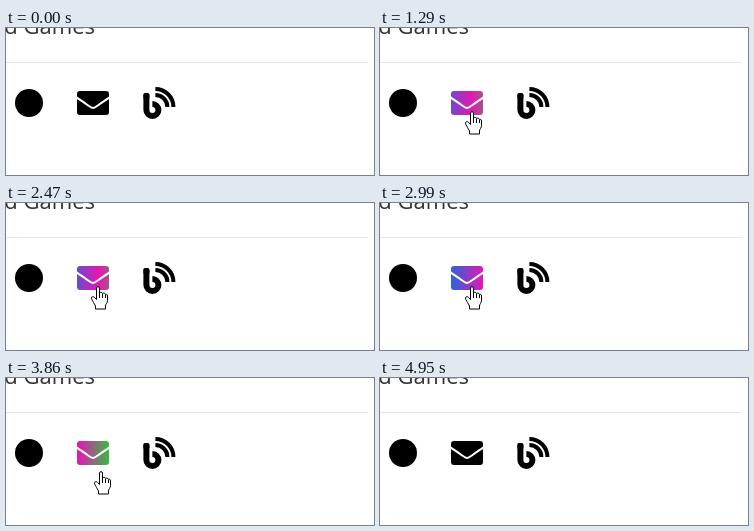
These frames come from a looping animation (368x147 px, 5010 ms). An HTML page:

```html
<!DOCTYPE html>
<html lang="en">
<head>
<meta charset="utf-8">
<title>Icon hover</title>
<style>
  html, body { margin: 0; width: 100%; height: 100%; overflow: hidden; background: #fff; }
  svg { display: block; width: 100vw; height: 100vh; }
  text { font: 22px "Open Sans", "Noto Sans", sans-serif; fill: #333; }
  .cursor { fill: #fff; stroke: #000; stroke-linejoin: round; }
</style>
</head>
<body>
<svg viewBox="0 0 368 147">
  <defs>
    <linearGradient id="hue" gradientUnits="userSpaceOnUse" x1="0" y1="0" x2="64" y2="0">
      <stop offset="0" stop-color="#2a65d8"/>
      <stop offset=".5" stop-color="#e318b2"/>
      <stop offset="1" stop-color="#30c040"/>
    </linearGradient>
  </defs>

  <text x="89" y="6" text-anchor="end">d Games</text>
  <path d="M0 34.5H362" stroke="#e6e6e6"/>

  <circle cx="23" cy="75" r="14"/>

  <g transform="translate(71 63)">
    <rect id="envelope" width="32" height="24" rx="3"/>
    <path d="M-.5 6.2L.6 7.1C3 8.9 5 10 10.8 14.2C12 15.1 14.2 17 16 17S20 15.1 21.2 14.2C27 10 29 8.9 31.4 7.1L32.5 6.2"
          fill="none" stroke="#fff" stroke-width="2"/>
  </g>

  <g transform="translate(137.4 59)" fill="none" stroke="#000">
    <rect y="6" width="6" height="6" rx="1.5" fill="#000" stroke="none"/>
    <path d="M3 8V23a6 6 0 1 0 6-6" stroke-width="6"/>
    <path d="M12 2A18 18 0 0 1 30 20M12 8A12 12 0 0 1 24 20" stroke-width="4"/>
  </g>

  <path id="arrow" class="cursor" d="M.5 .5V16.5L4.2 13 6.7 18.5 9 17.5 6.6 12.2H11.5Z"/>
  <g id="hand" class="cursor">
    <path d="M-.5 2C-.5 .2 2.5 .2 2.5 2V7C3 5.9 5.5 6 5.5 7.6C6.2 6.7 8.5 7 8.5 8.6
             C9.2 7.8 10.5 8.4 10.5 10V14.5C10.5 17 8.5 18 8.5 20V23H-1.5V20
             L-3.5 16.5C-4.5 14.5-5.5 13.5-5.5 12.2C-5.5 10.3-3.3 10.3-2.5 11.3L-.5 13.5Z"/>
    <path d="M2.5 7V12M5.5 8V12M8.5 9V12" fill="none"/>
  </g>
</svg>

<script>
const LOOP = 5010, FRAMES = 65, STEP = LOOP / FRAMES;
const HOVER_FROM = 14, HOVER_TO = 50;
const SWEEP = 1000;

// Pointer hotspot: [frame, x, y], straight moves in between, off stage outside.
const pointerPath = [[11, 201, 136], [12, 103, 114], [14, 92, 90], [15, 91, 83],
                     [48, 91, 83], [50, 94, 93], [51, 103, 112], [52, 235, 138]];

const byId = id => document.getElementById(id);
const envelope = byId("envelope"), hue = byId("hue"), arrow = byId("arrow"), hand = byId("hand");

// CSS "ease": cubic-bezier(.25, .1, .25, 1)
function ease(x) {
  let low = 0, high = 1;
  for (let i = 0; i < 20; i++) {
    const u = (low + high) / 2;
    if (.75 * u * (1 - u) + u ** 3 < x) low = u; else high = u;
  }
  const u = low, v = 1 - u;
  return .3 * v * v * u + 3 * v * u * u + u ** 3;
}

function pointerAt(frame) {
  const next = pointerPath.findIndex(([f]) => f >= frame);
  if (next < 0 || frame < pointerPath[0][0]) return null;
  const [f1, x1, y1] = pointerPath[next], [f0, x0, y0] = pointerPath[Math.max(next - 1, 0)];
  const k = f1 > f0 ? (frame - f0) / (f1 - f0) : 1;
  return [x0 + (x1 - x0) * k, y0 + (y1 - y0) * k].map(Math.round);
}

function place(cursor, position) {
  cursor.style.display = position ? "" : "none";
  if (position) cursor.setAttribute("transform", `translate(${position})`);
}

function draw(now) {
  const frame = Math.floor(now % LOOP / STEP + .35) % FRAMES;
  const hovering = frame >= HOVER_FROM && frame <= HOVER_TO;

  envelope.setAttribute("fill", hovering ? "url(#hue)" : "#000");
  if (hovering) {
    const sweeps = (frame - HOVER_FROM) * STEP / SWEEP;
    const progress = ease(sweeps % 1);
    const shift = -32 * (sweeps % 2 < 1 ? progress : 1 - progress);
    hue.setAttribute("gradientTransform", `translate(${shift})`);
  }

  const position = pointerAt(frame);
  place(hand, hovering && position);
  place(arrow, !hovering && position);
}

const start = performance.now();
function tick() {
  draw(performance.now() - start);
  requestAnimationFrame(tick);
}
tick();
</script>
</body>
</html>
```
